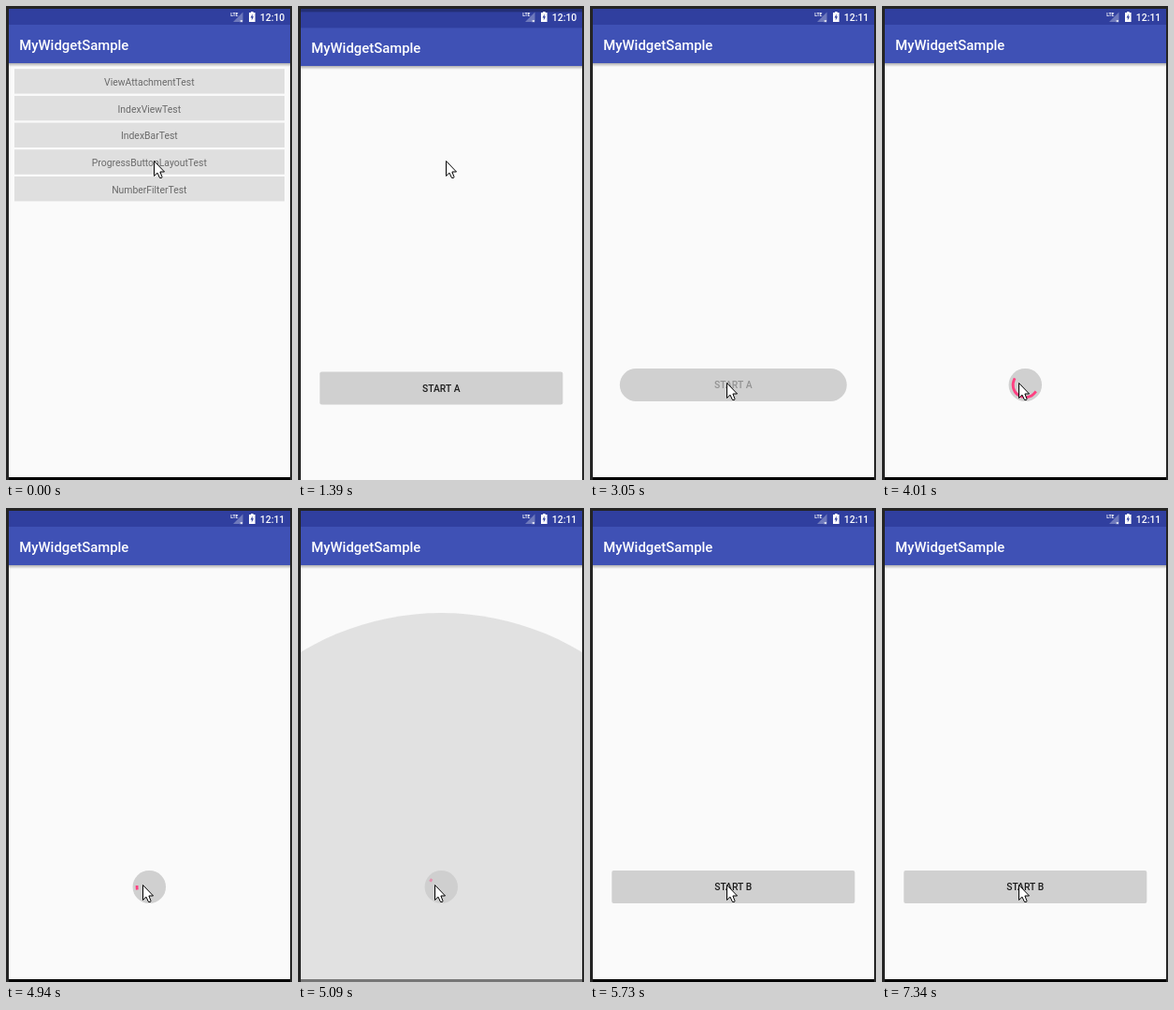
Recreate the animation shown at these times as an HTML page with a canvas. Size 306 px wide and 506 px high, loop 8000 ms.

```html
<!DOCTYPE html>
<html lang="en">
<head>
<meta charset="utf-8">
<title>Widget sample</title>
<style>
  html, body { margin: 0; width: 100%; height: 100%; overflow: hidden; background: #242424; }
  canvas { display: block; }
</style>
</head>
<body>
<canvas id="stage" width="306" height="506"></canvas>
<script>
const ctx = document.getElementById('stage').getContext('2d');
const FONT = 'Roboto, sans-serif';
const CENTER = { x: 153.3, y: 404.6 };
const RAD = Math.PI / 180;
const LOOP = 8000;
const STEP = 135; // the screen refreshes about 7.4 times a second

// Moments of the story, in ms.
const PAGE_OPENS = 1390, PAGE_SETTLES = 1510, POINTER_MOVES = 1790, BUTTON_SHRINKS = 3050,
  SPINNER_STARTS = 3590, SPINNER_CYCLES = 3740, REVEAL_STARTS = 5090, REVEAL_FILLS = 5210,
  SECOND_PAGE = 5730, SHAKE_STARTS = 6560, SHAKE_ENDS = 7340;

const ITEMS = ['ViewAttachmentTest', 'IndexViewTest', 'IndexBarTest',
  'ProgressButtonLayoutTest', 'NumberFilterTest'];

const clamp = v => Math.min(1, Math.max(0, v));
const stepped = (t, from) => from + STEP * Math.floor((t - from) / STEP);

// Cubic Bezier easing (.4, 0, .2, 1), solved by bisection.
function fastOutSlowIn(x) {
  let low = 0, high = 1;
  for (let i = 0; i < 20; i++) {
    const p = (low + high) / 2, q = 1 - p;
    if (1.2 * q * q * p + 0.6 * q * p * p + p ** 3 < x) low = p; else high = p;
  }
  return 3 * (1 - low) * low * low + low ** 3;
}

function rect(x, y, w, h, color) {
  ctx.fillStyle = color;
  ctx.fillRect(x, y, w, h);
}

function text(str, x, y, size, color, weight = 400, align = 'center') {
  ctx.font = `${weight} ${size}px ${FONT}`;
  ctx.textAlign = align;
  ctx.fillStyle = color;
  ctx.fillText(str, x, y);
}

function polygon(points, color) {
  ctx.beginPath();
  points.forEach(([x, y]) => ctx.lineTo(x, y));
  ctx.closePath();
  ctx.fillStyle = color;
  ctx.fill();
}

function statusIcons(clock) {
  text('LTE', 240.3, 11, 5, '#fff', 700, 'left');
  polygon([[243, 17], [253.5, 17], [253.5, 6.5]], 'rgba(255,255,255,.3)');
  text('×', 251.8, 17.5, 6, '#fff', 700);
  rect(260, 7, 6.6, 10, '#fff');
  rect(262, 6, 2.6, 1, '#fff');
  polygon([[263.8, 8.5], [261.5, 12.6], [263, 12.6], [262.7, 15.5], [265, 11.3], [263.6, 11.3]], '#303f9f');
  text(clock, 298.2, 15.6, 10.4, '#fff', 500, 'right');
}

function appFrame(shift, clock) {
  const barBottom = Math.round(61 + shift);
  rect(0, 0, 306, 506, '#242424');
  rect(3, 3, 301, 503, '#fafafa');
  const shadow = ctx.createLinearGradient(0, barBottom, 0, barBottom + 4);
  shadow.addColorStop(0, 'rgba(0,0,0,.3)');
  shadow.addColorStop(1, 'rgba(0,0,0,0)');
  rect(3, barBottom, 301, 4, shadow);
  rect(3, 3, 301, barBottom - 3, '#3f51b5');
  rect(3, 3, 301, 17 + shift, '#303f9f');
  rect(3, 3, 301, shift, 'rgba(0,0,0,.25)');
  text('MyWidgetSample', 14.3, 46.6 + shift, 14.86, '#fff', 500, 'left');
  statusIcons(clock);
  if (!shift) rect(3, 503, 301, 3, '#000');
}

function menu() {
  ITEMS.forEach((label, i) => {
    const y = 67.2 + i * 28.7;
    rect(9, y, 289, 26.4, '#dfdfdf');
    text(label, 153.3, y + 17.7, 10.4, '#6a6a6a');
  });
}

// collapse: 0 = full-width button, 1 = circle
function button(label, dx, dy, collapse, labelAlpha) {
  const width = 260 - 224.5 * collapse;
  ctx.beginPath();
  ctx.roundRect(CENTER.x - width / 2 + dx, 387 + dy, width, 35, collapse > 0 ? 17.5 : 2);
  ctx.fillStyle = '#d0d0d0';
  ctx.fill();
  if (labelAlpha > 0)
    text(label, CENTER.x + dx, 408.3 + dy, 10.25, `rgba(0,0,0,${0.87 * labelAlpha})`, 500);
}

function spinner(t) {
  let tail = 170, sweep = 230;
  if (t >= SPINNER_CYCLES) {
    const age = t - SPINNER_CYCLES;
    const phase = (age % 1333) / 666.5;
    const start = 270 * fastOutSlowIn(clamp(phase - 1));
    const end = 270 * fastOutSlowIn(clamp(phase));
    tail = -30 + 0.2458 * age + 270 * Math.floor(age / 1333) + start;
    sweep = end - start;
  }
  ctx.beginPath();
  ctx.arc(CENTER.x, CENTER.y, 13.2, tail * RAD, (tail + sweep + 2) * RAD);
  ctx.strokeStyle = '#ff4081';
  ctx.lineWidth = 2.8;
  ctx.lineCap = 'square';
  ctx.stroke();
}

function reveal(full) {
  ctx.save();
  ctx.beginPath();
  ctx.rect(3, 3, 301, 503);
  ctx.clip();
  ctx.beginPath();
  ctx.arc(CENTER.x, CENTER.y, full ? 480 : 292.5, 0, 2 * Math.PI);
  ctx.fillStyle = full ? '#d0d0d0' : 'rgba(208,208,208,.57)';
  ctx.fill();
  ctx.restore();
}

function firstPage(t, shift) {
  const progress = clamp((stepped(t, BUTTON_SHRINKS) - 2961) / 500);
  button('START A', 0, shift, (1 - Math.cos(Math.PI * progress)) / 2, clamp(1 - progress / 0.27));
  if (t >= SPINNER_STARTS) spinner(t >= REVEAL_STARTS ? REVEAL_STARTS : stepped(t, SPINNER_STARTS) + 15);
  if (t >= REVEAL_STARTS) reveal(t >= REVEAL_FILLS);
}

function secondPage(t) {
  const shaking = t >= SHAKE_STARTS && t < SHAKE_ENDS;
  const progress = (stepped(t, SHAKE_STARTS) - SHAKE_STARTS) / (SHAKE_ENDS - SHAKE_STARTS);
  button('START B', shaking ? 2.5 * Math.sin(13 * progress) : 0, 0, 0, 1);
}

function pointer(t) {
  const p = clamp((stepped(t, POINTER_MOVES) - POINTER_MOVES + STEP) / (5 * STEP));
  const x = 158 - 12 * (1 - (1 - p) ** 6);
  const y = 165 + 237 * (1 - (1 - p ** 1.6) ** 3);
  ctx.save();
  ctx.translate(Math.round(x) + 0.5, Math.round(y) + 0.5);
  polygon([[0, 0], [0, 16], [3.5, 12.7], [6, 18], [8, 18], [8.5, 17], [6.4, 11.5], [11, 11.5]], '#fff');
  ctx.strokeStyle = '#000';
  ctx.lineWidth = 1;
  ctx.lineCap = 'butt';
  ctx.stroke();
  ctx.restore();
}

function draw(t) {
  const shift = t >= PAGE_OPENS && t < PAGE_SETTLES ? 3.4 : 0;
  appFrame(shift, t < PAGE_SETTLES ? '12:10' : '12:11');
  if (t < PAGE_OPENS) menu();
  else if (t < SECOND_PAGE) firstPage(t, shift);
  else secondPage(t);
  pointer(t);
}

const begin = performance.now();
function frame() {
  draw((performance.now() - begin) % LOOP);
  requestAnimationFrame(frame);
}
frame();
</script>
</body>
</html>
```
